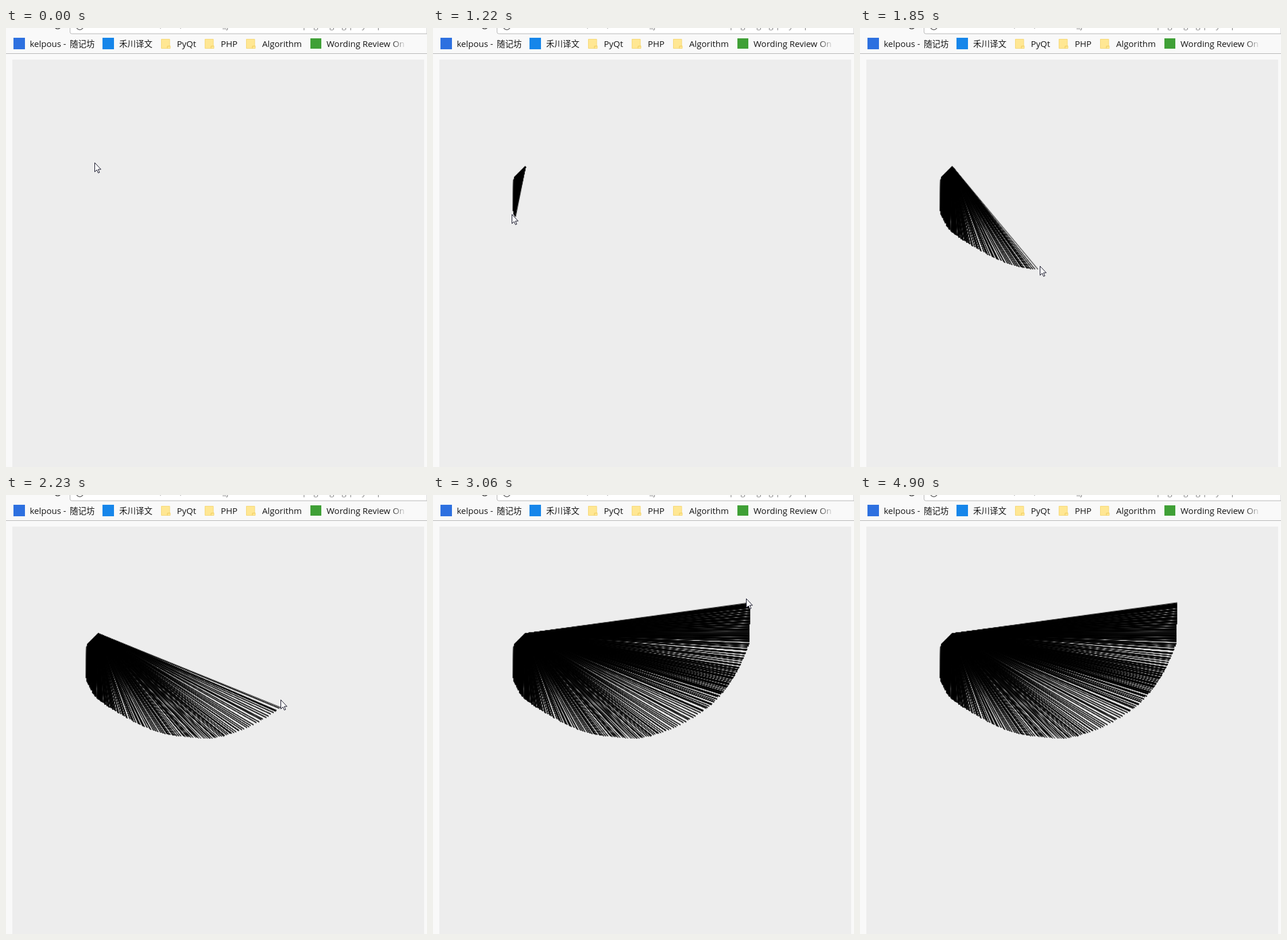
These frames come from a looping animation (733x764 px, 5.27 s). An HTML page with a canvas:

```html
<!DOCTYPE html>
<html lang="en">
<head>
<meta charset="utf-8">
<title>Line fan sketch</title>
<style>
html, body { margin: 0; width: 100%; height: 100%; overflow: hidden; background: #f9f9f9; }
svg, canvas { position: absolute; left: 0; top: 0; display: block; }
text { font: 15px "Open Sans", sans-serif; fill: #151515; white-space: pre; }
.cjk { font: 14.5px "Noto Sans CJK SC", "Noto Sans CJK", sans-serif; }
.address text { fill: #8a8a8a; }
</style>
</head>
<body>
<svg width="733" height="764">
  <defs>
    <linearGradient id="fade" gradientUnits="userSpaceOnUse" x1="670" y1="0" x2="698" y2="0">
      <stop offset="0" stop-color="#151515"/>
      <stop offset="1" stop-color="#151515" stop-opacity="0"/>
    </linearGradient>
    <clipPath id="tabEnd"><rect x="550" y="14" width="143.5" height="28"/></clipPath>
    <g id="folder">
      <path d="M.5.5h14.5v11.5h1v4.5H.5z" fill="#ffe793" stroke="#f5d878"/>
      <path d="M11 16.5v-4h4.5" fill="none" stroke="#efcb5c"/>
    </g>
  </defs>

  <g class="address">
    <path d="M111.5-5V7q0 3 3 3H733V-5z" fill="#fff" stroke="#b4b4b4"/>
    <circle cx="90" cy="-4" r="5.5" fill="none" stroke="#555" stroke-width="1.6"/>
    <circle cx="128.5" cy="-3" r="6" fill="none" stroke="#666" stroke-width="1.4"/>
    <text x="268" y="1">/</text>
    <text x="303" y="1">/</text>
    <text x="377" y="0">_j</text>
    <text x="517" y="0">png/raging/play/mp</text>
  </g>

  <rect y="44" width="733" height="1" fill="#b5b5b5"/>
  <rect x="13" y="17" width="20" height="20" fill="#2d70e0"/>
  <text x="41.5" y="33">kelpous - </text><text class="cjk" x="111" y="33">随记坊</text>
  <rect x="168" y="17" width="20" height="20" fill="#1686ea"/>
  <text class="cjk" x="197" y="33">禾川译文</text>
  <use href="#folder" x="270" y="19"/><text x="297.5" y="33">PyQt</text>
  <use href="#folder" x="346" y="19"/><text x="374" y="33">PHP</text>
  <use href="#folder" x="418" y="19"/><text x="446" y="33">Algorithm</text>
  <rect x="530" y="18" width="19" height="18" fill="#3fa036"/>
  <text x="558" y="33" style="fill:url(#fade)" clip-path="url(#tabEnd)">Wording Review Onl</text>

  <rect x="11" y="55" width="717" height="709" fill="#ededed"/>
</svg>
<canvas id="stage" width="733" height="764"></canvas>
<script>
const LOOP = 5270, START = 150, STOP = 3100;
const EVENT = 8;          // ms between pointer events
const LAG = 20;           // ink trails the pointer
const PASSES = 4;         // recent lines are stroked again on every event
const ZOOM = 1.25, LEFT = 11, TOP = 55, HOTSPOT = 8;

// pointer path: time, x, y
const keys = [
  [150, 154, 234], [600, 132, 260], [1080, 132, 306], [1340, 146, 340],
  [1540, 179, 366], [1770, 277, 410], [1920, 343, 416], [2060, 398, 403],
  [2230, 478, 356], [2500, 523, 297], [2670, 544, 243], [3060, 545, 180],
  [4230, 545, 180], [4680, 709, 660], [4900, 701, 772]
];

const slope = (i, c) => (keys[i + 1][c] - keys[i][c]) / (keys[i + 1][0] - keys[i][0]);

function tangent(i, c) {
  if (i === 0 || i === keys.length - 1) return 0;
  const a = slope(i - 1, c), b = slope(i, c);
  return a * b <= 0 ? 0 : 2 * a * b / (a + b);
}

// monotone cubic through the keys
function pointer(t) {
  const last = keys.length - 1;
  if (t <= keys[0][0]) return keys[0].slice(1);
  if (t >= keys[last][0]) return keys[last].slice(1);
  const i = keys.findIndex(k => k[0] > t) - 1;
  const h = keys[i + 1][0] - keys[i][0], u = (t - keys[i][0]) / h, v = 1 - u;
  return [1, 2].map(c =>
    keys[i][c] * (1 + 2 * u) * v * v + tangent(i, c) * h * u * v * v +
    keys[i + 1][c] * u * u * (3 - 2 * u) - tangent(i + 1, c) * h * u * u * v);
}

function random(n) {
  const s = Math.sin(n * 127.1 + 11.7) * 43758.5453;
  return s - Math.floor(s);
}

function makeLines() {
  const lines = [];
  for (let n = 0; START + n * EVENT < STOP; n++) {
    const t = START + n * EVENT + random(n) * 4;
    const [px, py] = pointer(t).map(Math.round);
    const x = Math.floor((px + HOTSPOT - LEFT) / ZOOM);
    const y = Math.floor((py + HOTSPOT - TOP) / ZOOM);
    const prev = lines[lines.length - 1];
    if (!prev || prev.x !== x || prev.y !== y) lines.push({ t: t + LAG, x, y });
  }
  return lines;
}

const lines = makeLines();
const ctx = document.getElementById("stage").getContext("2d");
const sheet = document.createElement("canvas");
sheet.width = 574;
sheet.height = 568;
const ink = sheet.getContext("2d");
const arrow = new Path2D("M.5.5V16.3L4.2 12.9 6.6 18.3 8.9 17.3 6.5 12H11.3Z");
let drawn = 0;

function addLine(n) {
  ink.beginPath();
  for (let i = Math.max(0, n - PASSES + 1); i <= n; i++) {
    ink.moveTo(lines[0].x, lines[0].y);
    ink.lineTo(lines[i].x, lines[i].y);
  }
  ink.stroke();
}

function updateSheet(t) {
  if (drawn && lines[drawn - 1].t > t) {
    ink.clearRect(0, 0, sheet.width, sheet.height);
    drawn = 0;
  }
  while (drawn < lines.length && lines[drawn].t <= t) addLine(drawn++);
}

function drawPointer(t) {
  const [x, y] = pointer(t).map(Math.round);
  ctx.save();
  ctx.translate(x, y);
  ctx.fillStyle = "#fff";
  ctx.fill(arrow);
  ctx.strokeStyle = "#0c0c20";
  ctx.stroke(arrow);
  ctx.restore();
}

function frame(now) {
  const t = now % LOOP;
  updateSheet(t);
  ctx.clearRect(0, 0, 733, 764);
  ctx.drawImage(sheet, LEFT, TOP, sheet.width * ZOOM, sheet.height * ZOOM);
  drawPointer(t);
  requestAnimationFrame(() => frame(performance.now() - begin));
}

const begin = performance.now();
frame(0);
</script>
</body>
</html>
```
